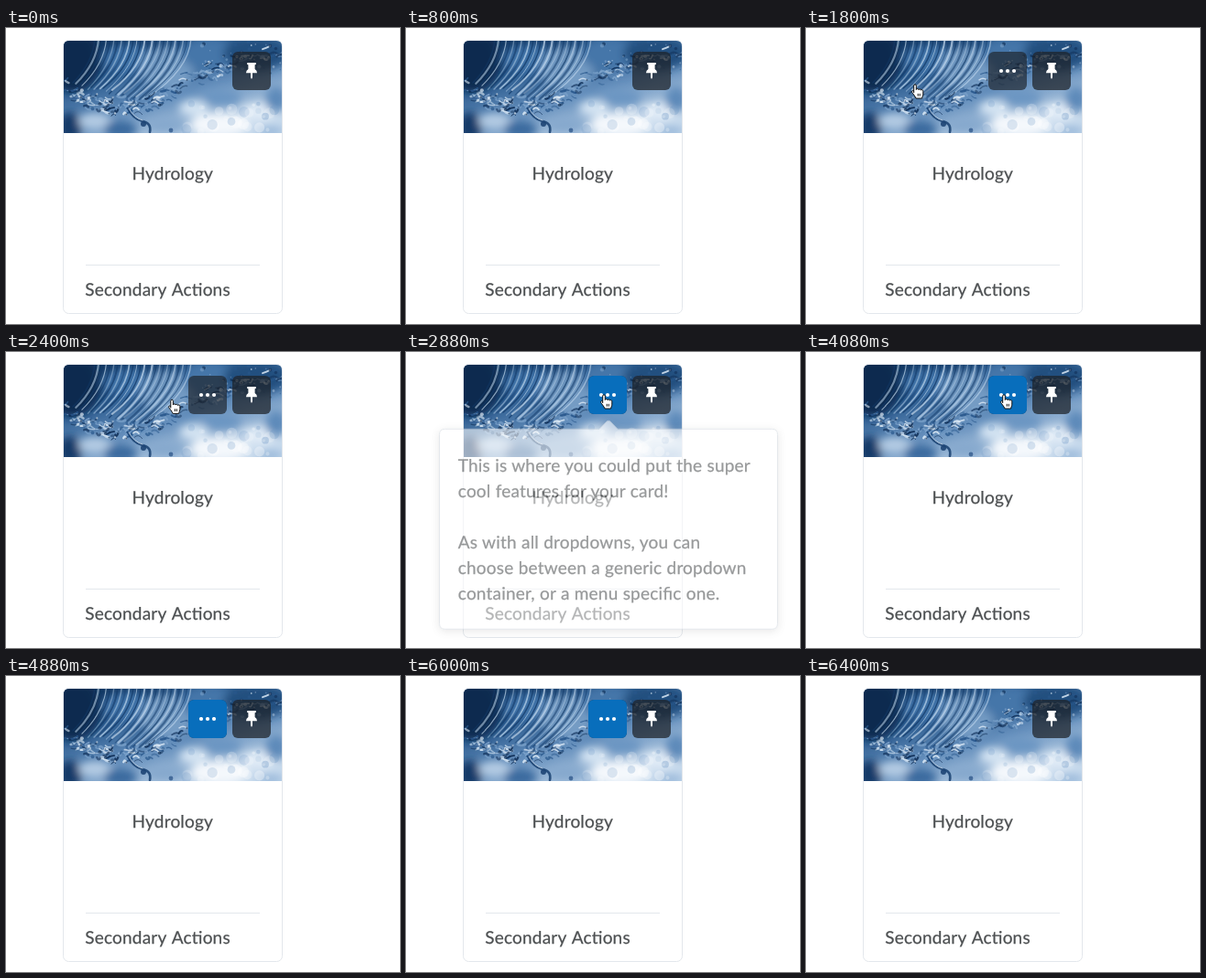
An HTML page for the animation above (7.48 s loop, 430 by 324 pixels).

```html
<!DOCTYPE html>
<html lang="en">
<head>
<meta charset="utf-8">
<title>Card with dropdown</title>
<style>
  html, body { margin: 0; width: 100%; height: 100%; overflow: hidden; background: #fff; }
  svg { display: block; width: 100%; height: 100%; }
  text {
    font: 19px Lato, Carlito, sans-serif;
    letter-spacing: .2px;
    font-feature-settings: "liga" 1;
    text-rendering: geometricPrecision;
    fill: #4d5052;
    stroke: #4d5052;
    stroke-width: .25px;
  }
</style>
</head>
<body>
<svg viewBox="0 0 430 324" xmlns="http://www.w3.org/2000/svg">
  <defs>
    <clipPath id="top"><path d="M0 101V6Q0 0 6 0H232Q238 0 238 6V101Z"/></clipPath>
    <linearGradient id="water" x1="0" y1="0" x2=".7" y2="1">
      <stop offset="0" stop-color="#0b2b52"/>
      <stop offset=".35" stop-color="#2a5a8e"/>
      <stop offset=".65" stop-color="#6690bd"/>
      <stop offset="1" stop-color="#c6d9ec"/>
    </linearGradient>
    <filter id="soft" x="-50%" y="-50%" width="200%" height="200%"><feGaussianBlur stdDeviation="5"/></filter>
    <filter id="haze" x="-20%" y="-20%" width="140%" height="140%"><feGaussianBlur stdDeviation=".6"/></filter>
    <filter id="shadow" x="-10%" y="-10%" width="120%" height="125%">
      <feDropShadow dx="0" dy="2" stdDeviation="5" flood-color="#565a5c" flood-opacity=".24"/>
    </filter>
  </defs>

  <rect x="62.5" y="13.5" width="239" height="299" rx="6" fill="#fff" stroke="#e3e7ec"/>
  <g transform="translate(63 14)" clip-path="url(#top)">
    <rect width="238" height="101" fill="url(#water)"/>
    <g filter="url(#soft)">
      <ellipse cx="10" cy="22" rx="30" ry="34" fill="#0b2a50"/>
      <ellipse cx="70" cy="20" rx="28" ry="16" fill="#3d70a5"/>
      <ellipse cx="112" cy="30" rx="30" ry="24" fill="#86abd1" opacity=".7"/>
      <ellipse cx="158" cy="14" rx="30" ry="18" fill="#4576a9"/>
      <ellipse cx="210" cy="14" rx="36" ry="18" fill="#24507f"/>
      <ellipse cx="6" cy="94" rx="14" ry="16" fill="#123a69"/>
      <ellipse cx="34" cy="88" rx="18" ry="9" fill="#b3cbe3"/>
      <ellipse cx="62" cy="97" rx="18" ry="10" fill="#3a6a9f"/>
      <ellipse cx="112" cy="92" rx="20" ry="9" fill="#86a9ce"/>
      <ellipse cx="142" cy="74" rx="16" ry="9" fill="#d3e3f2"/>
      <ellipse cx="172" cy="62" rx="22" ry="8" fill="#6a95c2"/>
      <ellipse cx="170" cy="92" rx="32" ry="13" fill="#f4f8fc"/>
      <ellipse cx="212" cy="78" rx="20" ry="10" fill="#e0ebf6"/>
      <ellipse cx="232" cy="64" rx="12" ry="14" fill="#5d8aba"/>
      <ellipse cx="226" cy="99" rx="14" ry="6" fill="#9dbbdb"/>
    </g>
    <g id="detail" fill="none" stroke-linecap="round" filter="url(#haze)"></g>
  </g>
  <text x="137.6" y="166">Hydrology</text>
  <path d="M87 259.5H277" stroke="#e3e7ec"/>
  <text x="86.3" y="293">Secondary <tspan dx="1.1">Actions</tspan></text>

  <g id="more">
    <rect x="199" y="26" width="42" height="42" rx="6" fill="#1e2228" fill-opacity=".66"/>
    <rect id="blue" x="199" y="26" width="42" height="42" rx="6" fill="#086ebc"/>
    <g fill="#fff"><circle cx="213" cy="47" r="2.1"/><circle cx="220" cy="47" r="2.1"/><circle cx="227" cy="47" r="2.1"/></g>
  </g>
  <rect x="247" y="26" width="42" height="42" rx="6" fill="#1e2228" fill-opacity=".72"/>
  <path d="M264 38H272Q273 38 273 39T272 40.3H271.6V45Q274 46.4 274 49.2H269V54L268 56 267 54V49.2H262Q262 46.4 264.4 45V40.3H264Q263 40 263 39T264 38Z" fill="#fff"/>

  <g id="drop">
    <path filter="url(#shadow)" fill="#fff" stroke="#d3d9e0"
      d="M42.5 88.5H211L219 80.2Q221 78.4 223 80.2L231 88.5H399.5Q405.5 88.5 405.5 94.5V301.5Q405.5 307.5 399.5 307.5H42.5Q36.5 307.5 36.5 301.5V94.5Q36.5 88.5 42.5 88.5Z"/>
    <text x="56.8" y="135">This is where you could put the super</text>
    <text x="56.8" y="163">cool features for your card!</text>
    <text x="56.8" y="219">As with all dropdowns, you can</text>
    <text x="56.8" y="247">choose between a generic dropdown</text>
    <text x="56.8" y="275">container, or a menu specific one.</text>
  </g>

  <g id="cursor">
    <path id="hand" transform="translate(-4.8 -.5)" fill="#fff" stroke="#111" stroke-width="1" stroke-linejoin="round"
      d="M3.5 9.5V1.6Q3.5.3 4.8.3T6.1 1.6V6q.2-1 1.3-1 1.2 0 1.4 1.1.3-.8 1.3-.7 1.1.1 1.2 1.2.4-.6 1.2-.5 1.1.2 1.1 1.6v3q0 1.5-.8 3l-.4 1.8H5.8q-.8-2-2.4-4Q1.9 9.6 1.5 8.8 1 7.7 1.9 7.2q.7-.2 1.6.8M8 10.3v2.8M10 10.3v2.8"/>
    <path id="arrow" fill="#111" stroke="#fff" stroke-width="1" d="M0 0V13.5L3.1 10.6 5.2 15.4 7.4 14.4 5.3 9.8H9.6Z"/>
  </g>
</svg>
<script>
const LOOP = 7480;
const $ = id => document.getElementById(id);
const clamp = v => Math.max(0, Math.min(1, v));
const mix = (a, b, k) => a + (b - a) * k;
const span = (t, from, length) => clamp((t - from) / length);
const smooth = k => k * k * (3 - 2 * k);

// CSS "ease" timing curve
function ease(x) {
  const bez = (a, b, u) => 3 * a * u * (1 - u) ** 2 + 3 * b * u * u * (1 - u) + u ** 3;
  let lo = 0, hi = 1;
  for (let i = 0; i < 20; i++) {
    const mid = (lo + hi) / 2;
    if (bez(.25, .25, mid) < x) lo = mid; else hi = mid;
  }
  return bez(.1, 1, lo);
}

function add(tag, attrs) {
  const el = document.createElementNS('http://www.w3.org/2000/svg', tag);
  for (const key in attrs) el.setAttribute(key, attrs[key]);
  $('detail').append(el);
}

function drawWater() {
  let seed = 11;
  const rnd = () => (seed = (seed * 16807) % 2147483647) / 2147483647;
  const line = (d, stroke, width, opacity) =>
    add('path', { d, stroke, 'stroke-width': width, opacity });
  const dot = (cx, cy, r, fill, opacity) => add('circle', { cx, cy, r, fill, opacity });

  // ripples fall from the top and sweep left into the crest
  for (let i = 0; i < 26; i++) {
    const x = 34 + i * 4.2, reach = 24 + i * .9;
    line(`M${x} -3Q${x - 2} ${24 + i * .3} ${x - reach} ${46 + i * .6 + rnd() * 5}`,
      i % 2 ? '#c4dbf0' : '#123a69', .8 + rnd() * 1.6, .35 + rnd() * .45);
  }

  // crest: a broken band of short curls and drops
  const crest = x => 54 + 18 * Math.sin(clamp(x / 130) * Math.PI) - 40 * smooth(clamp((x - 80) / 158));
  const shades = ['#0e2d55', '#28578c', '#dbe9f6', '#7da3cb'];
  for (let i = 0; i < 170; i++) {
    const x = rnd() * 242 - 2, y = crest(x) + (rnd() + rnd() - 1) * 12;
    const dx = 3 + rnd() * 6, dy = (rnd() - .6) * 7;
    line(`M${x} ${y}q${dx / 2} ${(rnd() - .5) * 9} ${dx} ${dy}`, shades[i % 4], .8 + rnd() * 2, .45 + rnd() * .5);
    if (i % 3 == 0) dot(x + dx, y + dy, .6 + rnd() * 1.6, shades[(i + 2) % 4], .7);
  }

  // spray at the upper right
  for (let i = 0; i < 40; i++)
    dot(150 + rnd() * 88, rnd() * 36, .5 + rnd() * 1.7, shades[i % 4], .3 + rnd() * .4);

  // hanging strand and light spots
  line('M70 74Q76 86 86 88T94 100', '#173f70', 2.6, .85);
  line('M71 74Q77 85 86 87', '#d6e5f4', 1, .8);
  dot(87, 91, 3, '#1d4474', .9);
  dot(117, 98, 2.4, '#254f83', .7);
  for (let i = 0; i < 30; i++)
    dot(120 + rnd() * 115, 66 + rnd() * 34, 1.5 + rnd() * 5, i % 3 ? '#fff' : '#6f99c6', .12 + rnd() * .25);
}

// [start, length, from x, from y, to x, to y]
const moves = [
  [1240, 560, -12, 98, 119, 62],
  [2080, 540, 119, 62, 216, 47],
  [4320, 540, 216, 47, 124, -18]
];

function cursorAt(t) {
  let [, , x, y] = moves[0];
  for (const [start, length, x0, y0, x1, y1] of moves) {
    if (t < start) break;
    const k = smooth(span(t, start, length));
    x = mix(x0, x1, k);
    y = mix(y0, y1, k);
  }
  return [x, y];
}

function render(t) {
  const [x, y] = cursorAt(t);
  const onCard = x > 62 && y > 13;
  $('cursor').setAttribute('transform', `translate(${x} ${y})`);
  $('cursor').style.display = t > 1240 && t < 4870 ? '' : 'none';
  $('hand').style.display = onCard ? '' : 'none';
  $('arrow').style.display = onCard ? 'none' : '';

  $('more').style.opacity = ease(span(t, 1520, 200)) * (1 - ease(span(t, 6000, 300)));
  $('blue').style.opacity = ease(span(t, 2470, 150));

  const open = t < 3680 ? ease(span(t, 2780, 300)) : 0;
  $('drop').style.opacity = open;
  $('drop').style.display = open ? '' : 'none';
  $('drop').setAttribute('transform', `translate(0 ${-10 * (1 - open)})`);
}

// even word gaps whichever Lato release is present
function setWordGap() {
  const pen = document.createElement('canvas').getContext('2d');
  pen.font = '19px Lato, Carlito, sans-serif';
  const gap = 5 - pen.measureText(' ').width;
  document.querySelectorAll('text').forEach(el => el.style.wordSpacing = gap + 'px');
}

drawWater();
setWordGap();
const begin = performance.now();
function tick() {
  render((performance.now() - begin) % LOOP);
  requestAnimationFrame(tick);
}
tick();
</script>
</body>
</html>
```
